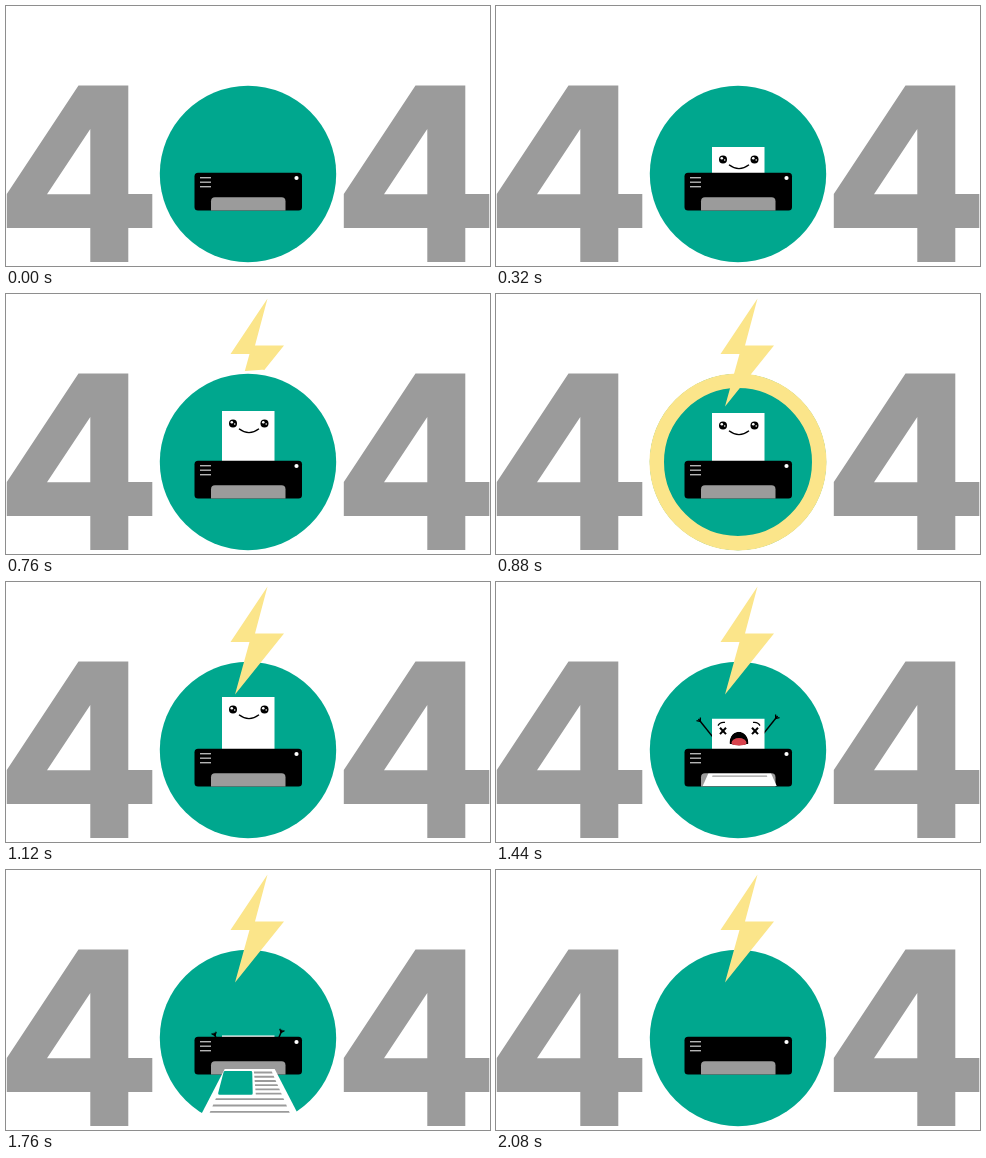
An HTML page with a canvas for the animation above (2560 ms loop, 484 px wide and 260 px high).

```html
<!DOCTYPE html>
<html lang="en">
<head>
<meta charset="utf-8">
<title>404</title>
<style>
html, body { margin: 0; width: 100%; height: 100%; overflow: hidden; background: #fff; }
canvas { display: block; }
</style>
</head>
<body>
<canvas id="stage" width="484" height="260" role="img" aria-label="404"></canvas>
<script>
const ctx = document.getElementById('stage').getContext('2d');
const GREY = '#9b9b9b', GREEN = '#00a78e', YELLOW = '#fbe58a';
const LOOP = 2560, STEP = 40;

const clamp = x => Math.max(0, Math.min(1, x));
const ramp = (t, a, b) => clamp((t - a) / (b - a));
const lerp = (a, b, k) => a + (b - a) * k;

function trace(points, close = true) {
  points.forEach(([x, y], i) => i ? ctx.lineTo(x, y) : ctx.moveTo(x, y));
  if (close) ctx.closePath();
}
function poly(color, ...shapes) {
  ctx.fillStyle = color;
  ctx.beginPath();
  shapes.forEach(s => trace(s));
  ctx.fill('evenodd');
}
function line(color, width, points) {
  ctx.strokeStyle = color;
  ctx.lineWidth = width;
  ctx.beginPath();
  trace(points, false);
  ctx.stroke();
}
function disc(color, x, y, r) {
  ctx.fillStyle = color;
  ctx.beginPath();
  ctx.arc(x, y, r, 0, 7);
  ctx.fill();
}
function box(color, x, y, w, h, r) {
  ctx.fillStyle = color;
  ctx.beginPath();
  ctx.roundRect(x, y, w, h, r);
  ctx.fill();
}
function clipped(x, y, w, h, draw) {
  ctx.save();
  ctx.beginPath();
  ctx.rect(x, y, w, h);
  ctx.clip();
  draw();
  ctx.restore();
}

function four(dx) {
  const move = pts => pts.map(([x, y]) => [x + dx, y]);
  poly(GREY,
    move([[72.5, 79.5], [122.3, 79.5], [122.3, 188], [146.3, 188], [146.3, 222],
      [122.3, 222], [122.3, 256], [84.3, 256], [84.3, 222], [0.8, 222], [0.8, 188]]),
    move([[84.3, 123], [84.3, 188.3], [41, 188.3]]));
}

function ring(t) {
  const w = 14.5 * (t <= 880 ? ramp(t, 800, 880) : 1 - ramp(t, 880, 1080));
  if (!w) return;
  ctx.strokeStyle = YELLOW;
  ctx.lineWidth = w;
  ctx.beginPath();
  ctx.arc(242, 168, 88.5 - w / 2, 0, 7);
  ctx.stroke();
}

// The bolt is uncovered along its zigzag spine.
function bolt(t) {
  if (t < 480) return;
  const x = t - 560;
  ctx.save();
  ctx.beginPath();
  trace([[261.5, 4.5], [249, 51.5], [278, 51.5], [229, 112.5], [243.5, 60], [224.5, 60]]);
  if (t >= 840) {
    ctx.fillStyle = YELLOW;
    ctx.fill();
  } else {
    ctx.clip();
    ctx.setLineDash([27 + 0.262 * x + 0.000634 * x * x, 999]);
    line(YELLOW, 40, [[261.5, 4.5], [238, 57], [264, 55], [229, 113]]);
  }
  ctx.restore();
}

function paperTop(t) {
  if (t < 560) return lerp(167, 115, ramp(t, 80, 560));
  if (t < 1200) return 115 + 4 * Math.sin(Math.PI * ramp(t, 640, 1120)) ** 2;
  return 115 + 50.5 * (t - 1200) / 560;
}

function happyFace(y) {
  for (const x of [227, 258.5]) {
    disc('#000', x, y + 12.5, 4);
    disc('#fff', x - 1.2, y + 11.3, 1.3);
    disc('#fff', x + 1.7, y + 13, 0.8);
  }
  ctx.strokeStyle = '#000';
  ctx.lineWidth = 1.4;
  ctx.beginPath();
  ctx.moveTo(233, y + 17.8);
  ctx.quadraticCurveTo(243, y + 25.5, 253, y + 17.8);
  ctx.stroke();
}

function scaredFace(y) {
  for (const side of [-1, 1]) {
    const x = 243 + 16 * side, e = y + 12.3;
    line('#000', 2, [[x - 3, e - 3.2], [x + 3, e + 3.2]]);
    line('#000', 2, [[x - 3, e + 3.2], [x + 3, e - 3.2]]);
    ctx.lineWidth = 1.2;
    ctx.beginPath();
    ctx.moveTo(243 + 14 * side, y + 3.8);
    ctx.quadraticCurveTo(243 + 19 * side, y + 3, 243 + 21 * side, y + 7);
    ctx.stroke();
  }
  ctx.save();
  ctx.beginPath();
  ctx.moveTo(233.5, y + 25);
  ctx.bezierCurveTo(233, y + 9, 252.5, y + 9, 252.5, y + 25);
  ctx.quadraticCurveTo(243, y + 28.5, 233.5, y + 25);
  ctx.clip();
  ctx.fillStyle = '#000';
  ctx.fill();
  ctx.fillStyle = '#d8424c';
  ctx.beginPath();
  ctx.ellipse(243, y + 24, 7.5, 4.6, 0, 0, 7);
  ctx.fill();
  ctx.restore();
}

function arm(x, y, side, angle) {
  ctx.save();
  ctx.translate(x, y);
  ctx.scale(side, 1);
  ctx.rotate(-angle);
  line('#000', 1.5, [[0, 0], [22.5, 0]]);
  line('#000', 1.3, [[22.5, -2.5], [19.5, 0], [22.5, 2.5]]);
  ctx.restore();
}

function paper(t) {
  const y = paperTop(t);
  if (y >= 167) return;
  const scared = t >= 1240;
  clipped(180, 0, 124, 168, () => {
    if (scared) {
      const angle = (42 + 36 * Math.sin((t - 1430) / 240 * 2 * Math.PI)) * Math.PI / 180;
      arm(216.5, y + 18, -1, angle);
      arm(267.5, y + 15, 1, angle);
    }
    box('#fff', 216, y, 52.5, 80, 0);
    (scared ? scaredFace : happyFace)(y);
  });
}

function printer() {
  box('#000', 188.5, 166.7, 107.5, 37.8, 3.5);
  for (const y of [171.7, 176.2, 180.7]) line('#b5b5b5', 1.4, [[194, y], [205, y]]);
  disc('#fff', 290.5, 172, 2.1);
  box(GREY, 205, 191.3, 74.5, 13.2, [4, 4, 0, 0]);
}

// Printed sheet in perspective: u runs -1..1 across, v runs 0..1 down.
function sheet(t) {
  if (t < 1320 || t >= 2080) return;
  const s = (t - 1760) / 320, out = s > 0;
  const top = 199 + s * (out ? 40 + 18 * s : 33);
  const bottom = 257 + s * (out ? 73 : 53);
  const topHalf = 25 + 5 * s, bottomHalf = 55 + 18 * s;
  const at = (u, v) => [243.7 + u * lerp(topHalf, bottomHalf, v), lerp(top, bottom, v)];
  const bar = (u1, u2, v) => {
    const h = 0.016;
    poly(GREY, [at(u1, v - h), at(u2, v - h), at(u2, v + h), at(u1, v + h)]);
  };
  clipped(150, 191.5, 184, 69, () => {
    poly('#fff', [at(-1, 0), at(1, 0), at(1, 1), at(-1, 1)]);
    const image = [at(-0.92, 0.06), at(0.04, 0.06), at(0.04, 0.42), at(-0.8, 0.42)];
    ctx.strokeStyle = GREEN;
    ctx.lineJoin = 'round';
    ctx.lineWidth = 3;
    poly(GREEN, image);
    ctx.stroke();
    ctx.lineJoin = 'miter';
    for (let i = 0; i < 6; i++) bar(0.16, 0.84, 0.06 + i * 0.073);
    for (const v of [0.52, 0.63, 0.74]) bar(-0.84, 0.84, v);
  });
}

function draw(now) {
  const t = Math.floor(now % LOOP / STEP) * STEP;
  ctx.fillStyle = '#fff';
  ctx.fillRect(0, 0, 484, 260);
  four(0);
  four(337);
  disc(GREEN, 242, 168, 88.2);
  ring(t);
  bolt(t);
  paper(t);
  printer();
  sheet(t);
}

const start = performance.now();
function tick() {
  draw(performance.now() - start);
  requestAnimationFrame(tick);
}
tick();
</script>
</body>
</html>
```
